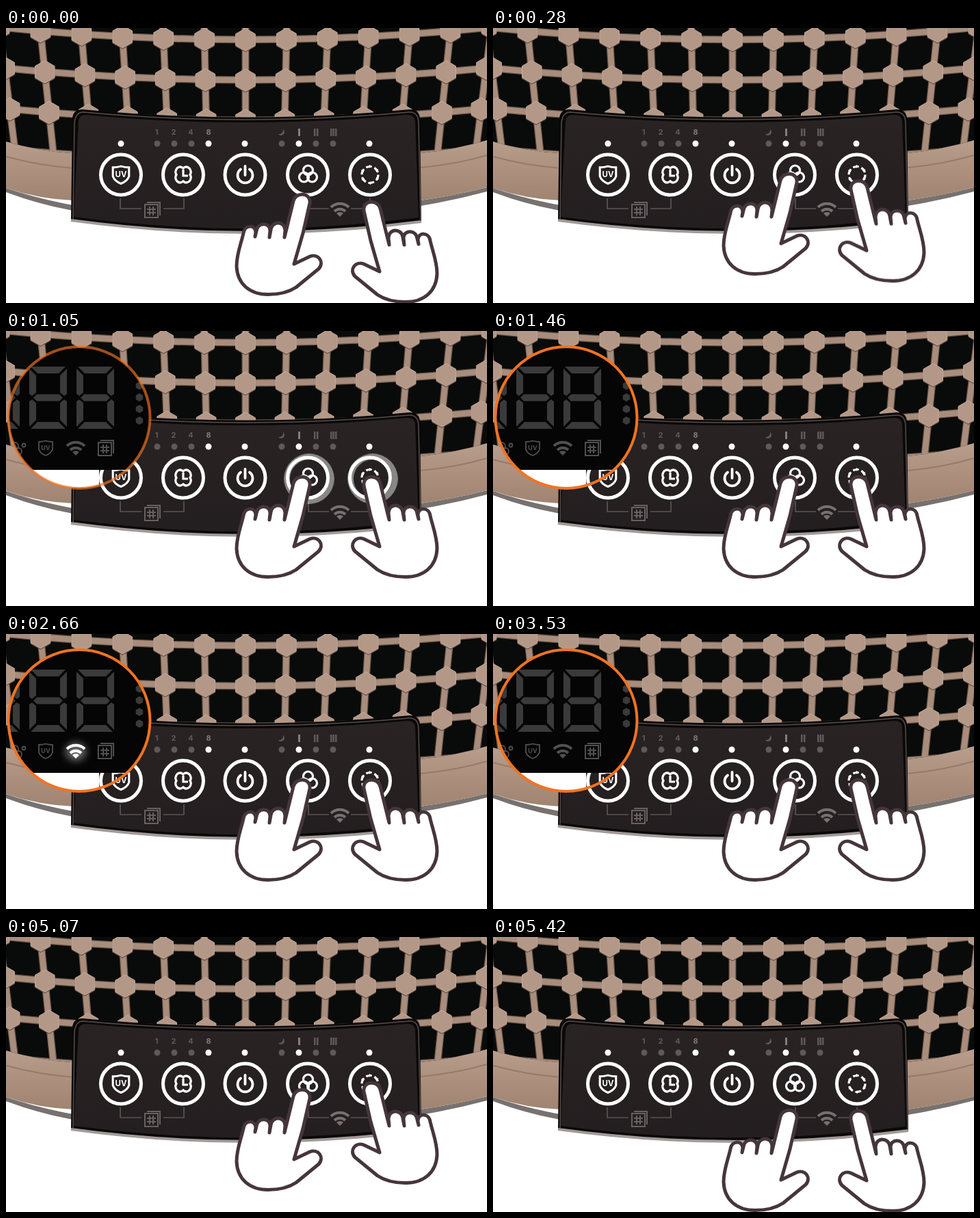
Recreate the animation shown at these times as an HTML page. Size 703 by 402 pixels, loop 6080 ms.

```html
<!DOCTYPE html>
<html lang="en">
<head>
<meta charset="utf-8">
<title>Control panel pairing</title>
<style>
  html, body { margin: 0; width: 100%; height: 100%; overflow: hidden; background: #fff; }
  svg { display: block; width: 703px; height: 402px; }
  text { font-family: "Inter", "Liberation Sans", sans-serif; font-weight: 700; text-anchor: middle; }

  /* 1% of the loop is 60.8 ms; the small lead keeps steps on the right side of their times */
  .left, .right, .ring, .disc, .rim, .patch, .lit {
    animation: 6080ms linear -4ms infinite;
  }
  .left { animation-name: left; }
  .right { animation-name: right; }
  .ring { animation-name: grow, glow; transform-box: fill-box; transform-origin: center; }
  .disc { animation-name: disc; }
  .rim { animation-name: rim; }
  .patch { animation-name: patch; }
  .lit { animation-name: blink; animation-timing-function: step-end; }

  @keyframes left {
    0% { transform: translateY(30px); animation-timing-function: steps(3); }
    3.4539% { transform: translateY(0); }
    82.2368% { transform: translateY(0); animation-timing-function: steps(4); }
    86.8421%, 100% { transform: translateY(40px); }
  }
  @keyframes right {
    0% { transform: translateY(41px); }
    1.1513% { transform: translateY(41px); animation-timing-function: steps(4); }
    5.7566% { transform: translateY(0); }
    84.5395% { transform: translateY(0); animation-timing-function: steps(4); }
    89.1447%, 100% { transform: translateY(41px); }
  }
  @keyframes grow {
    0% { transform: scale(.479); }
    5.7566% { transform: scale(.479); animation-timing-function: steps(14); }
    21.875%, 100% { transform: scale(1); }
  }
  @keyframes glow {
    0% { opacity: 0; }
    5.7566% { opacity: 0; animation-timing-function: steps(4); }
    10.3618% { opacity: .36; animation-timing-function: steps(6); }
    17.2697% { opacity: .46; animation-timing-function: steps(4); }
    21.875% { opacity: .14; animation-timing-function: step-end; }
    24.0132%, 100% { opacity: 0; }
  }
  @keyframes disc {
    0% { opacity: 0; }
    10.3618% { opacity: 0; animation-timing-function: steps(5); }
    16.1184%, 65.625% { opacity: 1; }
    65.6251% { opacity: 1; animation-timing-function: steps(3); }
    69.0789% { opacity: .93; animation-timing-function: steps(2); }
    71.3816%, 100% { opacity: 0; }
  }
  @keyframes rim {
    0% { opacity: 0; }
    10.3618% { opacity: 0; animation-timing-function: steps(9); }
    20.7237% { opacity: 1; }
    65.625% { opacity: 1; animation-timing-function: steps(5); }
    71.3816%, 100% { opacity: 0; }
  }
  @keyframes patch {
    0% { opacity: 0; }
    10.3618% { opacity: 0; animation-timing-function: steps(5); }
    16.1184% { opacity: 1; }
    65.625% { opacity: 1; animation-timing-function: steps(5); }
    71.3816%, 100% { opacity: 0; }
  }
  @keyframes blink {
    0%, 38.3224%, 48.1908%, 58.0592% { opacity: 0; }
    33.8816%, 43.75%, 53.6184% { opacity: 1; }
    100% { opacity: 0; }
  }
</style>
</head>
<body>
<svg viewBox="0 0 703 402" xmlns="http://www.w3.org/2000/svg">
  <defs>
    <linearGradient id="copper" x1="0" y1="0" x2="0" y2="1">
      <stop offset="0" stop-color="#b99f8e"/>
      <stop offset=".5" stop-color="#ad907e"/>
      <stop offset="1" stop-color="#a08472"/>
    </linearGradient>
    <linearGradient id="face" x1="0" y1="0" x2="0" y2="1">
      <stop offset="0" stop-color="#292324"/>
      <stop offset="1" stop-color="#231e1f"/>
    </linearGradient>
    <filter id="soft" x="-50%" y="-50%" width="200%" height="200%"><feGaussianBlur stdDeviation="6"/></filter>
    <clipPath id="lens"><circle cx="107" cy="126.5" r="103"/></clipPath>
    <clipPath id="mesh"><path d="M0 0H703V164Q655 178 606 183H96Q48 180 0 166Z"/></clipPath>

    <g id="wifi" fill="none" stroke="currentColor" stroke-width="4">
      <path d="M-13-3a19 19 0 0 1 26 0M-8 3a11.500 11.500 0 0 1 16 0"/>
      <path d="M0 11L-5 6a7 7 0 0 1 10 0Z" fill="currentColor" stroke="none"/>
    </g>
    <g id="filter" fill="none" stroke="currentColor" stroke-width="2">
      <path d="M-11-8H8V11H-11ZM-8-11H11V8M-4-5V8M1-5V8M-8-1H5M-8 4H5"/>
    </g>
    <path id="shield" fill="none" stroke="currentColor" d="M-10-9Q-5-9 0-10.500Q5-9 10-9V2Q8 8 0 11Q-8 8-10 2Z"/>
    <g id="digit">
      <path d="M2 0H53L43 10H12ZM2 91H53L43 81H12ZM11 40.500H44L49 45.500L44 50.500H11L6 45.500Z"/>
      <path id="post" d="M0 3L10 13V38L4 43L0 40ZM0 88L10 78V53L4 48L0 51Z"/>
      <use href="#post" transform="translate(55) scale(-1 1)"/>
    </g>
    <path id="hand" fill="#fff" stroke="#45363b" stroke-width="5" stroke-linejoin="round" stroke-linecap="round"
      d="M407 276L420 223C423 209 446 210 444 226L434 270L421 315L444 304C456 299 466 312 457 322
         L424 349C412 357 398 359.500 383 359.500C356 359.500 338 344 337 318C337 300 344 284 347 270
         C349 257 365 257 365 269L364 275L366 267C368 253 386 254 386 266L385 276L387 265C389 251 408 252 408 266Z"/>
  </defs>

  <rect width="703" height="402" fill="#fff"/>
  <path d="M0 234Q48 250 98 259V267Q48 258 0 240ZM703 233Q655 245 606 252V260Q655 252 703 239Z" fill="#77716f"/>
  <path d="M0 160H703V233Q655 245 606 252H98Q48 250 0 234Z" fill="url(#copper)"/>
  <path d="M0 188Q48 201 98 205M703 186Q655 200 606 204" fill="none" stroke="#97796a" stroke-width="2"/>
  <g clip-path="url(#mesh)">
    <rect width="703" height="200" fill="#090b0a"/>
    <g id="grille"></g>
  </g>

  <!-- control panel -->
  <path d="M97 132Q98 119 112 119Q350 142 590 119Q604 119 605 132L607 283Q352 316 95 281Z" fill="#0b0808"/>
  <path d="M95 281Q352 316 607 283" fill="none" stroke="#a09a98" stroke-width="4"/>
  <path d="M106 136Q107 127 117 127Q350 149 585 127Q597 126 598 136L603 277Q352 310 99 276Z" fill="url(#face)"/>
  <path d="M98 280L100 140Q101 123 113 123Q350 145 589 123Q602 122 603 138L606 282" fill="none" stroke="#554e4e" stroke-width="1.500"/>

  <g id="lamps"></g>
  <g font-size="11" fill="#605a5a">
    <text x="220" y="156">1</text><text x="245" y="156">2</text><text x="270" y="156">4</text>
    <text x="296" y="156" fill="#837d7d">8</text>
    <path d="M405 148A5 5 0 1 1 398 155A6 6 0 0 0 405 148Z"/>
    <path d="M427 147h3v11h-3z" fill="#837d7d"/>
    <path d="M450 147h2.500v11h-2.500zM454 147h2.500v11h-2.500zM474 147h2.500v11h-2.500zM477.500 147h2.500v11h-2.500zM481 147h2.500v11h-2.500z"/>
  </g>
  <path d="M167 249V264H198M260 249V264H230M442 249V264H472M532 249V264H504" fill="none" stroke="#5b5554" stroke-width="1.700"/>
  <use href="#filter" x="214" y="266" color="#68615f"/>
  <use href="#wifi" x="488" y="265" color="#77706f"/>

  <g id="buttons" fill="none" stroke="#fff" stroke-width="5"></g>
  <g fill="none" stroke="#fff" stroke-width="3.200">
    <use href="#shield" transform="translate(168 214.500) scale(1.180)" stroke-width="2.600" color="#fff"/>
    <text x="168" y="218" font-size="11.500" fill="#fff" stroke="none">UV</text>
    <path d="M259 205Q263 201 268 205Q272 210 269 214.500Q272 219 268 224Q263 228 259 224Q254 228 250 224Q246 219 249 214.500Q246 210 250 205Q254 201 259 205ZM259 207V216H266"/>
    <path d="M343 206.500A11 11 0 1 0 356 206.500M349.500 202V215" stroke-width="3.800" stroke-linecap="round"/>
    <circle cx="441.500" cy="208" r="7"/><circle cx="435.500" cy="218" r="7"/><circle cx="447.500" cy="218" r="7"/>
    <circle cx="532" cy="214.500" r="12" stroke-dasharray="8.500 4.066"/>
    <g id="arrows" fill="#fff" stroke="none"></g>
  </g>

  <g fill="none" stroke="#fff" stroke-width="10">
    <circle class="ring" cx="443" cy="216" r="38"/>
    <circle class="ring" cx="536" cy="216" r="38"/>
  </g>

  <!-- magnified display -->
  <g clip-path="url(#lens)">
    <path class="patch" d="M0 202H136V232H0Z" fill="#fff"/>
    <g class="disc">
      <path d="M0 20H214V203H0Z" fill="#050505"/>
      <g fill="#3a3a3a">
        <use href="#digit" x="-35" y="52"/>
        <use href="#digit" x="34" y="52"/>
        <use href="#digit" x="103" y="52"/>
        <g id="pips"></g>
      </g>
      <g color="#505050" fill="none" stroke="#505050" stroke-width="1.800">
        <circle cx="13" cy="168" r="5"/><circle cx="9" cy="176" r="5"/><circle cx="18" cy="176" r="5"/><circle cx="26" cy="167" r="2.500"/>
        <use href="#shield" x="58" y="171"/>
        <text x="58" y="174" font-size="9" fill="#505050" stroke="none">UV</text>
        <use href="#wifi" x="102" y="171"/>
        <use href="#filter" x="146" y="171"/>
      </g>
    </g>
    <g class="lit" color="#fff">
      <ellipse cx="102" cy="172" rx="15" ry="13" fill="#fff" opacity=".42" filter="url(#soft)"/>
      <use href="#wifi" x="102" y="171"/>
    </g>
  </g>
  <circle class="rim" cx="107" cy="126.500" r="103.500" fill="none" stroke="#f27322" stroke-width="4"/>

  <g class="left"><use href="#hand"/></g>
  <g class="right"><use href="#hand" transform="translate(967) scale(-1 1)"/></g>
</svg>
<script>
  const fill = (id, html) => { document.getElementById(id).innerHTML = html; };
  const range = (a, b) => Array.from({ length: b - a + 1 }, (_, i) => a + i);

  // Rows sag towards the middle; columns draw together lower down.
  const node = (col, row) => {
    const dx = col * (59.9 - row * 1.25);
    return [350 + dx, 17 + row * 59 - dx * dx * 1.4e-4];
  };
  // Pointed at the top and bottom.
  const hexagon = (x, y, r) => range(0, 5).map(i => {
    const a = (i * 60 + 30) * Math.PI / 180;
    return (x + r * Math.cos(a)).toFixed(1) + "," + (y + r * Math.sin(a)).toFixed(1);
  }).join(" ");

  const cols = range(-7, 7), rows = range(-1, 3);
  const line = points => `<polyline points="${points.join(" ")}"/>`;
  const bars = rows.map(r => line(cols.map(c => node(c, r)))).join("") +
               cols.map(c => line(rows.map(r => node(c, r)))).join("");
  const knobs = rows.slice(0, 4).flatMap(r => cols.map(c => {
    const [x, y] = node(c, r);
    return `<polygon points="${hexagon(x, y + 1.5, 17)}" fill="#6b5549"/>
            <polygon points="${hexagon(x, y, 16.5)}" fill="#b49887" stroke="#c4ab9b"/>`;
  })).join("");
  fill("grille", `<g fill="none" stroke="#6b5549" stroke-width="11">${bars}</g>
    <g fill="none" stroke="#a98d7c" stroke-width="8.500">${bars}</g>${knobs}`);

  const lamp = color => x => `<circle cx="${x}" cy="169" r="4.500" fill="${color}"/>`;
  fill("lamps", [168, 296, 349, 428, 531].map(lamp("#fff")).join("") +
                [221, 246, 271, 403, 453, 478].map(lamp("#5f5958")).join(""));
  fill("buttons", [168, 259, 349.5, 441, 532].map(x => `<circle cx="${x}" cy="214.500" r="29.500"/>`).join(""));
  fill("arrows", range(0, 5).map(i =>
    `<path d="M541.500 212h5l-2.500 4.500z" transform="rotate(${i * 60 + 36} 532 214.500)"/>`).join(""));
  fill("pips", range(0, 3).map(i => `<polygon points="${hexagon(195, 80 + i * 17, 6)}"/>`).join(""));
</script>
</body>
</html>
```
